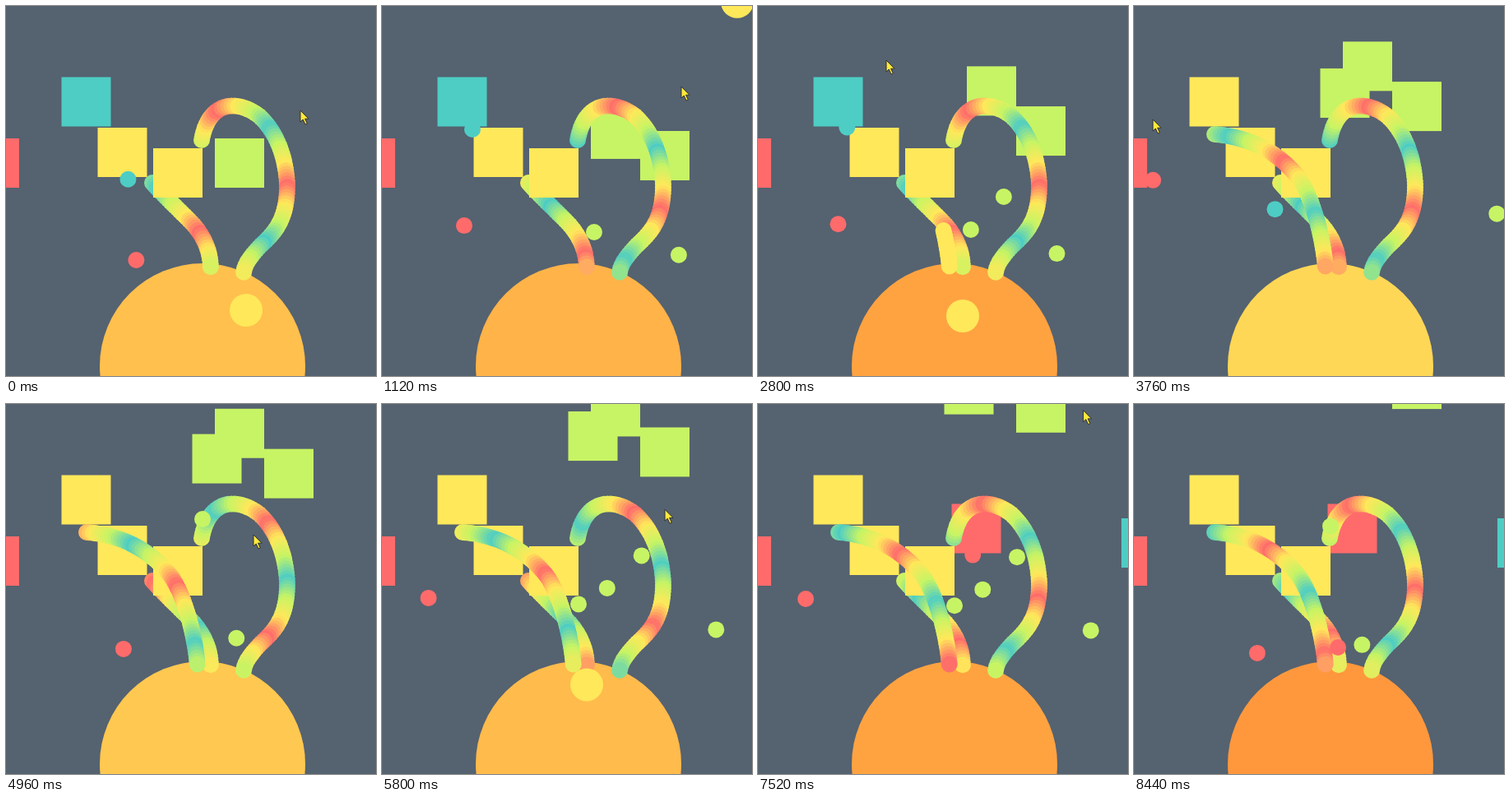
An HTML page with a canvas for the animation above (8520 ms loop, 450 by 450 pixels).

```html
<!DOCTYPE html>
<html lang="en">
<head>
<meta charset="utf-8">
<title>Tentacle planet</title>
<style>
html, body { margin: 0; width: 100%; height: 100%; overflow: hidden; background: #556270; }
canvas { display: block; }
</style>
</head>
<body>
<canvas id="stage" width="450" height="450"></canvas>
<script>
const ctx = document.getElementById('stage').getContext('2d');
const LOOP = 8520, BEAT = 1705, SPEED = 0.123, WAVE = 150;
const RED = '#ff6b6b', YELLOW = '#ffe85a', GREEN = '#c7f464', TEAL = '#4ecdc4';
const PLANET = { x: 239, y: 438, r: 125 };
const ATTACH = 3490; // the new tentacle reaches its square

const RAMP = [[255, 107, 107], [255, 232, 90], [199, 244, 100], [78, 205, 196]];
const mix = (a, b, k) => a + (b - a) * k;
const mod = (a, n) => ((a % n) + n) % n;

// Piecewise linear value from [time, value] pairs
function track(keys, t) {
  let i = 0;
  while (i < keys.length - 2 && t > keys[i + 1][0]) i++;
  const [t0, a] = keys[i], [t1, b] = keys[i + 1];
  return mix(a, b, Math.min(1, (t - t0) / (t1 - t0)));
}

// Red at 0, then yellow, green, teal and back again
function rampColor(phase) {
  const p = mod(phase, 1), k = Math.min(p, 1 - p) * 6;
  const i = Math.min(2, Math.floor(k));
  return `rgb(${RAMP[i].map((c, n) => Math.round(mix(c, RAMP[i + 1][n], k - i)))})`;
}

function disc(x, y, r, color) {
  ctx.fillStyle = color;
  ctx.beginPath();
  ctx.arc(x, y, r, 0, 7);
  ctx.fill();
}

function box(x, y, color) {
  ctx.fillStyle = color;
  ctx.fillRect(x, y, 60, 60);
}

// Tentacles are sampled from tip to base
function tentacle(d, offset) {
  const path = document.createElementNS('http://www.w3.org/2000/svg', 'path');
  path.setAttribute('d', d);
  const length = path.getTotalLength(), points = [];
  for (let s = 0; s <= length; s += 4) {
    const { x, y } = path.getPointAtLength(s);
    points.push({ x, y, s });
  }
  return { length, points, offset };
}

const inner = tentacle('M178 215C188 227 218 255 228 266C242 282 249 300 249 320', 85);
const left = tentacle('M98 156C150 160 180 185 198 206C216 228 230 280 233 320', 64);
const right = tentacle('M238 163C246 118 278 112 307 133C332 155 341 190 342 218C342 262 325 277 309 292C298 304 289 315 289 326', 43);

const flow = [[0, 0], [1120, 1.2], [2800, 3], [3760, 4.2], [4960, 5.47], [6600, 7.2], [8440, 9.05]];

function drawTentacle({ points, offset }, t) {
  const phase = track(flow, t);
  for (const { x, y, s } of points) disc(x, y, 10, rampColor((s - offset) / WAVE - phase));
}

function growTentacle({ points, length }, t) {
  const shown = (t - 2615) * 0.27;
  for (const { x, y, s } of points) if (length - s <= shown) disc(x, y, 10, YELLOW);
}

// Small balls sent from (x, y) in direction (dx, dy), one per beat
const streams = [
  { x: -6, y: 191, dx: 0.812, dy: 0.583, start: 59, color: RED },
  { x: 97, y: 129.5, dx: 0.535, dy: 0.845, start: 923, until: ATTACH, color: TEAL },
  { x: 460, y: 241, dx: -0.849, dy: 0.529, start: 171, color: GREEN },
  { x: 284, y: 191, dx: -0.296, dy: 0.955, start: 405, color: GREEN },
  { x: 319, y: 175, dx: -0.333, dy: 0.943, start: 2309, from: 2300, color: GREEN },
  { x: 239, y: 105, dx: 0, dy: 1, start: 4675, from: 4600, color: GREEN },
  { x: 265, y: 151, dx: -0.116, dy: 0.993, start: 7253, from: 7200, color: RED }
];

function drawStream({ x, y, dx, dy, start, from = -1e5, until = 1e5, color }, t) {
  const age = mod(t - start, BEAT);
  for (const a of [age, age + BEAT]) {
    const bx = x + dx * SPEED * a, by = y + dy * SPEED * a;
    const eaten = by > 250 && Math.hypot(bx - PLANET.x, by - PLANET.y) < PLANET.r + 10;
    if (t - a >= from && t - a <= until && !eaten && by < 400) disc(bx, by, 10, color);
  }
}

// Large thrown balls: position at time "at", velocity in px per ms
const throws = [
  { x: 292, y: 370, vx: 0.125, vy: -0.335, at: 0, from: 0, to: 1300 },
  { x: 249, y: 377, vx: 0.01, vy: -0.357, at: 2800, from: 2720, to: 3560 },
  { x: 246, y: 377, vx: 0.03, vy: -0.356, at: 5700, from: 5620, to: 6330 },
  { x: 319, y: 320, vx: 0.254, vy: -0.251, at: 6600, from: 6430, to: 7200 }
];

const cursorX = [[0, 358], [1120, 364], [2800, 156], [3760, 23], [4960, 301], [6600, 385], [7900, 400]];
const cursorY = [[0, 127], [1120, 98], [2800, 66], [3760, 138], [4960, 159], [6600, 99], [7900, -30]];
const arrow = new Path2D('M0 0V14L3.2 11L6 17L8.3 16L5.6 10.2H10Z');

const glow = [[0, 192], [1120, 179], [2800, 163], [ATTACH, 155]];
const freshGlow = [[ATTACH, 219], [3760, 215], [4960, 200], [6600, 174], [8440, 152]];

function drawSquares(t) {
  box(-44, 161, RED);
  box(67.5, 86.5, t < ATTACH ? TEAL : YELLOW);
  box(111.5, 148, YELLOW);
  box(254, 161 - 0.0313 * t, GREEN);
  if (t >= 500) box(314, 152 - 0.0312 * Math.max(0, t - 1840), GREEN);
  if (t >= 3560) box(226.5, 82.5 - 0.0328 * (t - 3560), GREEN);
  if (t >= 6330) box(235.5, 121.5, RED);
  if (t >= 7200) box(442, 139, TEAL);
  box(179, 173, YELLOW);
}

function draw(t) {
  ctx.fillStyle = '#556270';
  ctx.fillRect(0, 0, 450, 450);

  const g = track(t < ATTACH ? glow : freshGlow, t);
  disc(PLANET.x, PLANET.y, PLANET.r, `rgb(255,${Math.round(g)},${Math.round(g * 0.4)})`);

  drawTentacle(inner, t);
  drawSquares(t);
  if (t < ATTACH) growTentacle(left, t);
  else drawTentacle(left, t);
  drawTentacle(right, t);

  for (const s of streams) drawStream(s, t);
  for (const b of throws) {
    if (t >= b.from && t < b.to) disc(b.x + b.vx * (t - b.at), b.y + b.vy * (t - b.at), 20, YELLOW);
  }

  ctx.save();
  ctx.translate(track(cursorX, t), track(cursorY, t));
  ctx.fillStyle = '#ffe93c';
  ctx.strokeStyle = '#2e3030';
  ctx.fill(arrow);
  ctx.stroke(arrow);
  ctx.restore();
}

const began = performance.now();
function frame() {
  const t = (performance.now() - began) % LOOP;
  draw(Math.floor(t / 40) * 40);
  requestAnimationFrame(frame);
}
frame();
</script>
</body>
</html>
```
